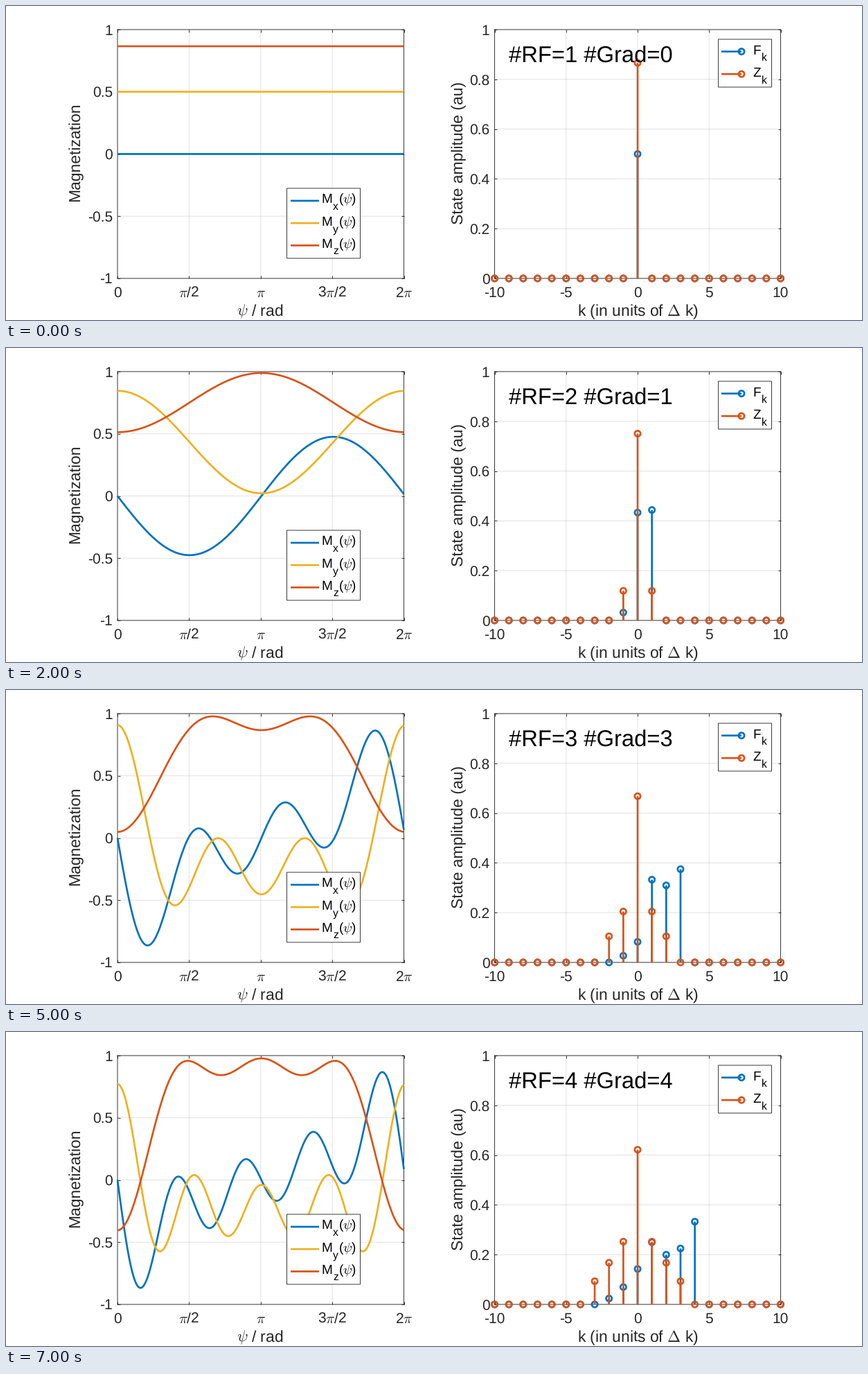
A matplotlib script for the animation above (8000 ms loop, 1236 by 453 pixels).

```python
import numpy as np
import matplotlib.pyplot as plt
from matplotlib.animation import FuncAnimation
from matplotlib.patches import Rectangle

W, H = 1236, 453
TOP, BOTTOM = 34, 393
BLUE, YELLOW, ORANGE, INK = "#0072BD", "#EDB120", "#D95319", "#262626"
TICK, LABEL, LEGEND, TITLE = 21, 22.9, 19, 32.8
LW, THIN = 2.7, 0.9

plt.rcParams.update({
    "font.family": "Liberation Sans",
    "mathtext.fontset": "cm",
    "text.hinting": "no_hinting",
    "lines.solid_capstyle": "butt",
    "path.snap": False,
    "path.simplify": False,
})

# Spin ensemble: 30 degree pulses alternating with dephasing gradients
N, STEPS = 200, 8
FLIP = np.radians(30)
E1, E2 = np.exp(-5 / 1000), np.exp(-5 / 100)
K = np.arange(-10, 11)
phase = 2 * np.pi * np.arange(N) / N
psi = np.linspace(0, 2 * np.pi, N)


def pulse(m, z):
    c, s = np.cos(FLIP), np.sin(FLIP)
    return m.real + 1j * (c * m.imag + s * z), c * z - s * m.imag


def gradient(m, z):
    return E2 * m * np.exp(1j * phase), 1 - E1 * (1 - z)


def simulate():
    m, z = np.zeros(N, complex), np.ones(N)
    states = []
    for step in range(STEPS):
        m, z = (gradient if step % 2 else pulse)(m, z)
        states.append((m, z))
    return states


def amplitudes(values):
    return np.abs(np.fft.fft(values) / N)[K]


states = simulate()

fig = plt.figure(figsize=(W / 72, H / 72), dpi=72, facecolor="white")


def panel(x0, x1, xlim, ylim, xticks, yticks):
    ax = fig.add_axes([x0 / W, 1 - BOTTOM / H, (x1 - x0) / W, (BOTTOM - TOP) / H])
    ax.set(xlim=xlim, ylim=ylim, xticks=xticks, yticks=yticks)
    ax.set_axisbelow(True)
    ax.grid(color=INK, alpha=0.15, lw=THIN)
    ax.tick_params(direction="in", length=4, width=THIN, color=INK, top=True,
                   right=True, labelbottom=False, labelleft=False)
    for spine in ax.spines.values():
        spine.set(color=INK, linewidth=THIN, zorder=1)
    return ax


left = panel(161, 574.5, (0, 2 * np.pi), (-1, 1),
             np.arange(5) * np.pi / 2, np.arange(-1, 1.1, 0.5))
right = panel(705.5, 1118.5, (-10, 10), (0, 1),
              np.arange(-10, 11, 5), np.arange(0, 1.1, 0.2))

# Pixel-space layer for text and legends
over = fig.add_axes([0, 0, 1, 1], xlim=(0, W), ylim=(H, 0))
over.axis("off")


def put(x, y, s, size, ha="left", color=INK, rotation=0):
    return over.text(x, y, s, size=size, ha=ha, va="baseline", color=color,
                     rotation=rotation, rotation_mode="anchor", zorder=6)


def tick_labels(x0, x1, names_x, names_y):
    for x, s in zip(np.linspace(x0, x1, len(names_x)), names_x):
        put(x, 420, s, TICK, "center")
    for y, s in zip(np.linspace(BOTTOM, TOP, len(names_y)), names_y):
        put(x0 - 7, y + 7.5, s, TICK, "right")


def legend_box(x0, y0, x1, y1):
    over.add_patch(Rectangle((x0, y0), x1 - x0, y1 - y0, fc="white",
                             ec=INK, lw=THIN, zorder=4))


def circles(ax, xs, ys, radius=4.15):
    """Outlines of one pixel radius around data points, split by gaps."""
    a = np.append(np.linspace(0, 2 * np.pi, 25), np.nan)
    sx, sy = np.abs(ax.transData.transform([1, 1]) - ax.transData.transform([0, 0]))
    return (np.add.outer(xs, radius / sx * np.cos(a)).ravel(),
            np.add.outer(ys, radius / sy * np.sin(a)).ravel())


tick_labels(161, 574.5, ["0", r"$\pi$/2", r"$\pi$", r"3$\pi$/2", r"2$\pi$"],
            ["-1", "-0.5", "0", "0.5", "1"])
tick_labels(705.5, 1118.5, ["-10", "-5", "0", "5", "10"],
            ["0", "0.2", "0.4", "0.6", "0.8", "1"])
put(367, 447, r"$\psi$ / rad", LABEL, "center")
put(912, 447, r"k (in units of $\Delta$ k)", LABEL, "center")
put(106.5, 211, "Magnetization", LABEL, "center", rotation=90)
put(660.5, 212, "State amplitude (au)", LABEL, "center", rotation=90)
title = put(726, 82, "", TITLE, color="black")

legend_box(405.5, 263, 511.5, 364)
for i, (sub, color) in enumerate(zip("xyz", (BLUE, YELLOW, ORANGE))):
    y = 281 + 32.2 * i
    over.plot([411, 452], [y, y], color=color, lw=LW, zorder=5)
    put(455.5, y + 3.5, "M", LEGEND, color="black")
    put(472, y + 13, sub, 0.82 * LEGEND, color="black")
    put(480.5, y + 3.5, r"($\psi$)", LEGEND, color="black")

legend_box(1028.5, 48, 1105.5, 117)
for i, (name, color) in enumerate(zip("FZ", (BLUE, ORANGE))):
    y = 65.7 + 32.5 * i
    over.plot([1033, 1062], [y, y], color=color, lw=LW, zorder=5)
    over.plot(*circles(over, [1062], [y]), color=color, lw=LW, zorder=5)
    put(1078.6, y + 4, name, LEGEND, color="black")
    put(1091, y + 13.5, "k", 0.82 * LEGEND, color="black")

curves = [left.plot([], [], color=c, lw=LW, clip_on=False)[0]
          for c in (BLUE, YELLOW, ORANGE)]
stems = [[right.plot([], [], color=c, lw=LW, clip_on=False)[0]
          for _ in ("bars", "rings")] for c in (BLUE, ORANGE)]


def set_stem(parts, values):
    bars, rings = parts
    gap = np.full(len(K), np.nan)
    bars.set_data(np.repeat(K, 3),
                  np.column_stack([0 * values, values, gap]).ravel())
    rings.set_data(*circles(right, K, values))


def update(step):
    m, z = states[step]
    for curve, values in zip(curves, (m.real, m.imag, z)):
        curve.set_data(psi, values)
    for parts, values in zip(stems, (m, z)):
        set_stem(parts, amplitudes(values))
    title.set_text(f"#RF={step // 2 + 1} #Grad={(step + 1) // 2}")


anim = FuncAnimation(fig, update, frames=STEPS, interval=1000,
                     repeat=True, repeat_delay=0)
plt.show()
```
